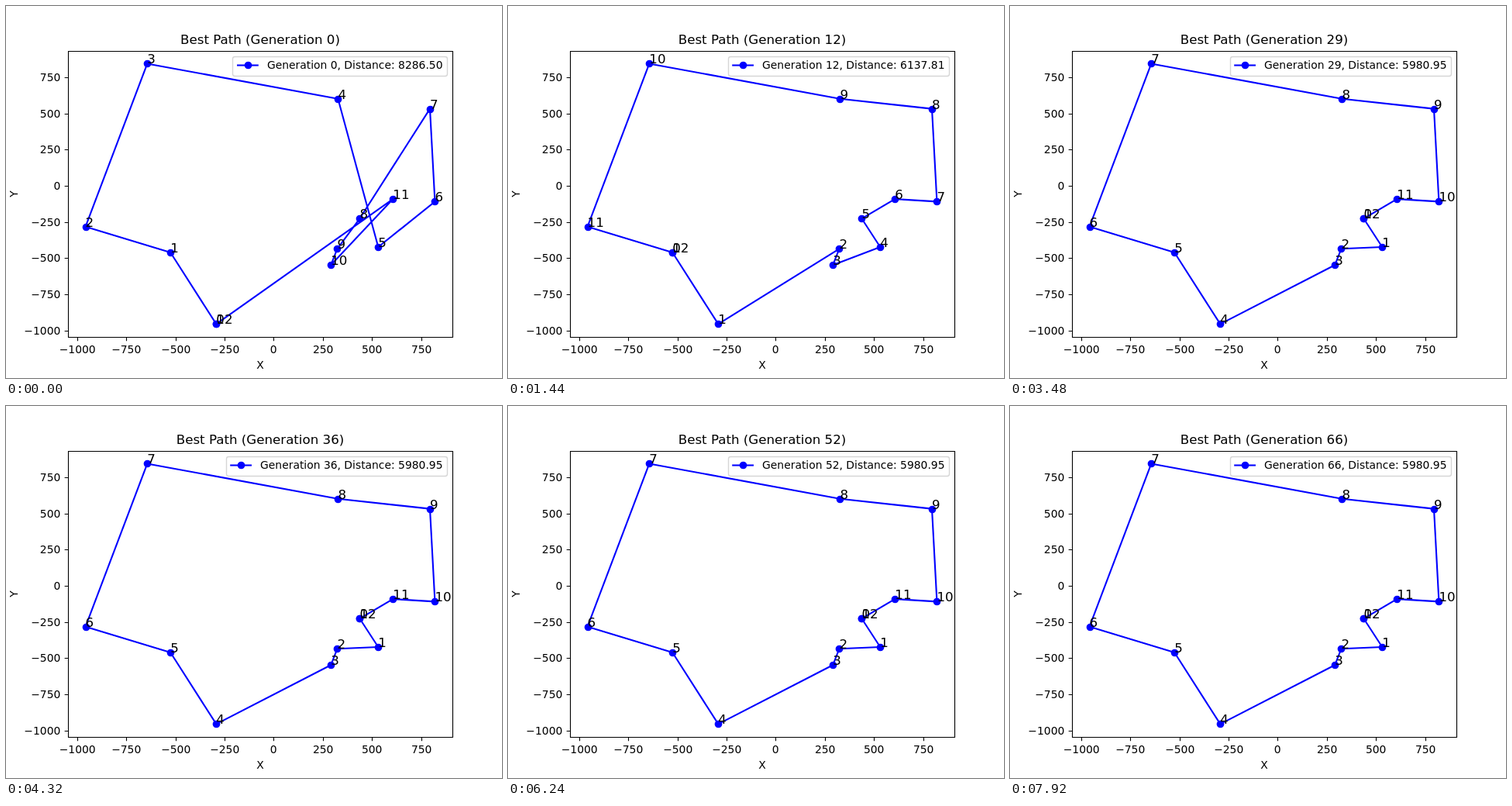
Recreate the animation shown at these times as an HTML page. Size 640 by 480 pixels, loop 8000 ms.

```html
<!DOCTYPE html>
<html lang="en">
<head>
<meta charset="utf-8">
<title>Best Path</title>
<style>
  html, body { margin: 0; width: 100%; height: 100%; overflow: hidden; background: #fff; }
  svg { display: block; width: 640px; height: 480px; }
  text { font: 13.889px "DejaVu Sans", sans-serif; fill: #000; }
  .big { font-size: 16.667px; }
  .middle { text-anchor: middle; }
  .end { text-anchor: end; }
  .axis { fill: none; stroke: #000; stroke-width: 1.111; }
  .path { fill: none; stroke: #00f; stroke-width: 2.083; stroke-linejoin: round; }
  .dot { fill: #00f; }
  .box { fill: #fff; fill-opacity: .8; stroke: #ccc; stroke-opacity: .8; stroke-width: 1.389; }
</style>
</head>
<body>
<svg id="stage" viewBox="0 0 640 480"></svg>
<script>
const LOOP = 8000, STEP = 120;
const cities = [
  [271.3, 410.4], [212.2, 318], [102.55, 284.8], [182.3, 74.4],
  [428.4, 119.8], [480.3, 311], [553.45, 252.4], [547, 132.6],
  [456.4, 274.3], [427.4, 313.3], [419.2, 334.3], [499.3, 249.1]
];
// Each tour lists its cities as base-12 digits.
const tours = [
  { from: 0, order: "0123456789ab", distance: "8286.50" },
  { from: 2, order: "2019a85b6473", distance: "7553.62" },
  { from: 3, order: "a56b89743120", distance: "7344.74" },
  { from: 10, order: "109a58b67432", distance: "6137.81" },
  { from: 25, order: "859a0123476b", distance: "5980.95" }
];

const stage = document.getElementById("stage");

function add(parent, tag, attrs = {}, content = "") {
  const node = document.createElementNS("http://www.w3.org/2000/svg", tag);
  for (const key in attrs) node.setAttribute(key, attrs[key]);
  node.textContent = content;
  parent.appendChild(node);
  return node;
}
const snap = v => Math.floor(v + 0.5) + 0.5;
const dot = (parent, x, y) =>
  add(parent, "circle", { class: "dot", cx: snap(x), cy: snap(y), r: 4.861 });

function drawAxes() {
  let d = "M80.5 58.5H576.5V427.5H80.5Z";
  for (let v = -1000; v <= 750; v += 250) {
    const x = snap(345.4 + v * 0.2535), y = snap(232 - v * 0.1868);
    const label = String(v).replace("-", "\u2212");
    d += `M${x} 427.5v4.86M80.5 ${y}h-4.86`;
    add(stage, "text", { class: "middle", x: x - 0.3, y: 448 }, label);
    add(stage, "text", { class: "end", x: 70.3, y: y + 4.5 }, label);
  }
  add(stage, "text", { class: "middle", x: 328, y: 467.5 }, "X");
  add(stage, "text", { class: "middle", transform: "translate(14.5 242.4) rotate(-90)" }, "Y");
  return d;
}

const frame = drawAxes();
const route = add(stage, "g");
add(stage, "path", { class: "axis", d: frame });
const labels = add(stage, "g");
const title = add(stage, "text", { class: "big middle", x: 328, y: 49 });
const legend = add(stage, "g");

function drawTour({ order }) {
  const stops = [...order + order[0]].map(c => cities[parseInt(c, 12)]);
  route.replaceChildren();
  labels.replaceChildren();
  add(route, "polyline", { class: "path", points: stops.join(" ") });
  stops.forEach(([x, y], i) => {
    dot(route, x, y);
    add(labels, "text", { class: "big", x, y: Math.round(y) }, i);
  });
}

function drawLegend(caption) {
  legend.replaceChildren();
  const box = add(legend, "rect", { class: "box", y: 65.5, height: 25, rx: 2.78 });
  const text = add(legend, "text", { y: 81 }, caption);
  const left = 569.06 - 50 - text.getComputedTextLength();
  const boxLeft = snap(left);
  box.setAttribute("x", boxLeft);
  box.setAttribute("width", 569.5 - boxLeft);
  text.setAttribute("x", left + 44.45);
  add(legend, "path", { class: "path", d: `M${left + 5.56} 76.5h27.78` });
  dot(legend, left + 19.45, 76);
}

let shownGeneration, shownTour;
function render(now) {
  const generation = Math.floor(now % LOOP / STEP);
  if (generation !== shownGeneration) {
    shownGeneration = generation;
    const tour = tours.filter(t => t.from <= generation).pop();
    if (tour !== shownTour) drawTour(shownTour = tour);
    title.textContent = `Best Path (Generation ${generation})`;
    drawLegend(`Generation ${generation}, Distance: ${tour.distance}`);
  }
}

const start = performance.now();
function tick() {
  render(performance.now() - start);
  requestAnimationFrame(tick);
}
tick();
</script>
</body>
</html>
```
